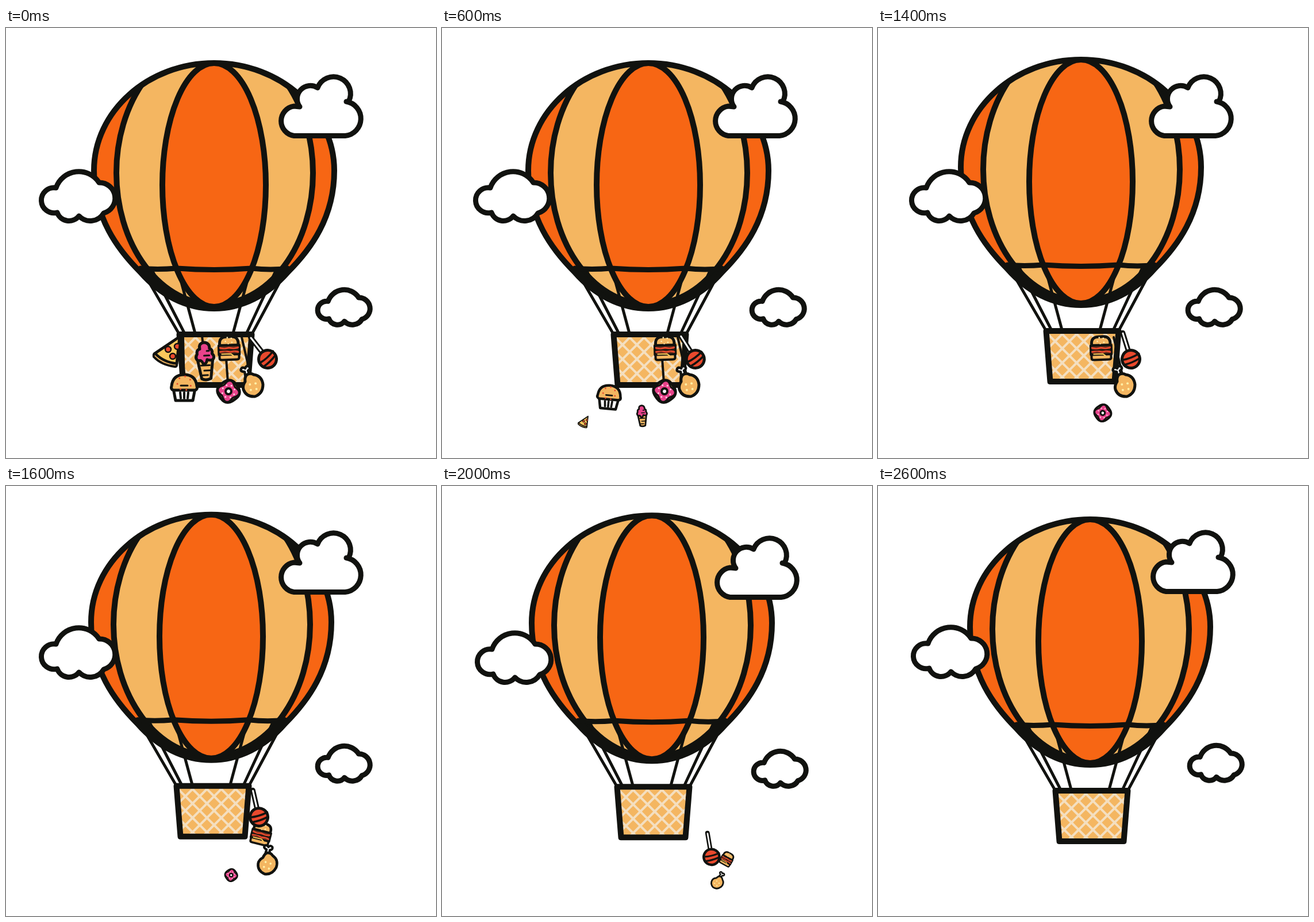
Recreate the animation shown at these times as an HTML page with a canvas. Size 748 px wide and 748 px high, loop 2800 ms.

```html
<!DOCTYPE html>
<html lang="en">
<head>
<meta charset="utf-8">
<title>Food balloon</title>
<style>
html, body { margin: 0; width: 100%; height: 100%; overflow: hidden; background: #fff; }
canvas { display: block; width: 748px; height: 748px; }
</style>
</head>
<body>
<canvas id="stage" width="748" height="748"></canvas>
<script>
const ctx = document.getElementById('stage').getContext('2d');
const INK = '#11120f', ORANGE = '#f76614', SAND = '#f4b661', RED = '#e9492d', PINK = '#e8438b', CREAM = '#f4dfc0';
const STEP = 200, STEPS = 14, TAU = Math.PI * 2;

function shape(d, fill, width = 5, stroke = INK) {
  const path = typeof d === 'string' ? new Path2D(d) : d;
  if (fill) { ctx.fillStyle = fill; ctx.fill(path); }
  if (width) { ctx.lineWidth = width; ctx.strokeStyle = stroke; ctx.stroke(path); }
}

function ellipse(x, y, rx, ry = rx) {
  const path = new Path2D();
  path.ellipse(x, y, rx, ry, 0, 0, TAU);
  return path;
}

// Closed curve r = radius + depth * cos(4a): a round shape with four lobes.
function lobes(radius, depth) {
  const path = new Path2D();
  for (let a = 0; a < TAU; a += TAU / 60) {
    const r = radius + depth * Math.cos(4 * a);
    path.lineTo(r * Math.cos(a), r * Math.sin(a));
  }
  path.closePath();
  return path;
}

function ringOfDots(count, radius, x, y, color, size) {
  for (let i = 0; i < count; i++) {
    const a = (i + 0.4) * TAU / count;
    shape(ellipse(x + radius * Math.cos(a), y + radius * Math.sin(a), size), color, 0);
  }
}

function placed(x, y, scale, degrees, draw) {
  ctx.save();
  ctx.translate(x, y);
  ctx.rotate(degrees * Math.PI / 180);
  ctx.scale(scale, scale);
  draw();
  ctx.restore();
}

function clipped(path, draw) {
  ctx.save();
  ctx.clip(path);
  draw();
  ctx.restore();
}

const envelope = new Path2D('M153 248C153 145 247 61 362 61S571 145 571 248C571 330 530 385 490 425' +
  'C455 465 410 488 362 488S269 465 234 425C194 385 153 330 153 248Z');
const basket = new Path2D('M301.5 533H427.5L420.5 621H308.5Z');
const ropes = new Path2D('M236 420L301 532M256 425L311 532M299 420L329 531' +
  'M488 420L428 532M468 425L418 532M425 420L395 531');

function drawBalloon() {
  shape(ropes);
  clipped(envelope, () => {
    shape(envelope, ORANGE, 0);
    shape(ellipse(363, 252, 171, 229), SAND, 10);
    shape(ropes);
    shape('M234 425C269 465 314 488 362 488S455 465 490 425', null, 20);
    shape(ellipse(362, 273, 90, 212), ORANGE, 10);
  });
  shape(envelope, null, 10);
  shape('M234 418Q262 421 297 418Q362 423 427 418Q462 422 490 418', null, 9);

  shape(basket, SAND, 0);
  clipped(basket, () => {
    for (let x = 187; x < 540; x += 25) shape(`M${x} 521l110 110M${x} 631l110 -110`, null, 4, CREAM);
  });
  shape(basket, null, 10);
}

const bigCloud = new Path2D('M501 187.5A26 26 0 0 1 501 136L511 137A23 23 0 0 1 542 104' +
  'A29.6 29.6 0 1 1 596 128L592 128A30 30 0 0 1 590 187.5Z');
const puffCloud = new Path2D('M87 278A42 42 0 0 1 162 269A27 27 0 0 1 170 322A27 27 0 0 1 127 327' +
  'A22 22 0 0 1 89 321A22 22 0 1 1 87 278Z');

function drawClouds() {
  shape(bigCloud, '#fff', 9);
  shape(puffCloud, '#fff', 9);
  placed(498.5, 278, 0.71, 0, () => shape(puffCloud, '#fff', 9 / 0.71));
}

function pizza() {
  const slice = new Path2D('M22 -25L-21 4Q-6 20 17 22Z');
  shape(slice, '#fbc75c');
  clipped(slice, () => {
    for (let i = 0; i < 3; i++) shape(ellipse(2 + 12 * (i % 2) + 4 * i, -3 - 11 * (i % 2) + 6 * i, 5), RED, 2.5);
  });
  shape('M-21 4Q-6 20 17 22Q18 28 13 27Q-10 24 -23 10Q-24 5 -21 4Z', SAND, 4);
}

function iceCream() {
  shape('M-13 -4L-7 31Q0 35 9 31L14 -4Z', SAND);
  shape('M-7 8H8M-2 17H9M-5 25H4', null, 3);
  shape('M-11 0Q-18 -5 -13 -12Q-14 -20 -8 -21Q-10 -31 0 -32Q10 -31 9 -21Q15 -19 13 -12' +
    'Q19 -6 13 -1Q8 0 4 -2Q2 7 -3 5Q-6 -3 -11 0Z', PINK);
  shape('M-1 -9H8M4 -17H8', null, 3);
}

function burger() {
  shape('M-16 -5Q-18 -20 -4 -20H4Q18 -20 16 -5Z', SAND);
  ringOfDots(5, 6, 0, -13, '#fff0b8', 1.3);
  shape('M-17 10H17V17Q17 20 13 20H-13Q-17 20 -17 17Z', SAND, 4);
  shape('M-18 -5H18V11H-18Z', '#76331f', 4);
  shape('M-16 -1L-8 1L0 -1L8 1L16 -1M-16 6L-7 4L2 7L9 5L16 7', null, 2.5, RED);
  shape('M-16 3H16', null, 2);
  shape('M-13 10H3L7 13', null, 2, '#ffd05a');
}

function cupcake() {
  shape('M-19 1L-15 22H15L19 1Z', '#fff');
  shape('M-7 8L-6 18M0 8V18M7 8L6 18', null, 4);
  shape('M-19 4Q-24 2 -22 -3Q-20 -23 0 -23T22 -3Q24 2 19 4Z', SAND);
  shape('M-6 -4H6', null, 3);
  ringOfDots(7, 12, 0, -8, RED, 1.5);
}

function donut() {
  shape(lobes(18.5, 0.8), '#f8d26c');
  shape(lobes(16, 2.5), PINK, 3);
  ringOfDots(8, 11, 0, 0, '#ffd3e5', 1.5);
  shape(ellipse(0, 0, 5), '#fff', 4);
}

function chicken() {
  shape('M-12 -12L-14 -22Q-22 -22 -20 -27Q-18 -31 -13 -28Q-11 -34 -6 -31Q-3 -27 -8 -24L-4 -14Z', '#fff', 4.5);
  shape('M-11 -16Q-5 -21 2 -17Q16 -15 18 0Q18 16 4 21Q-11 22 -16 9Q-18 2 -13 -5Q-14 -11 -11 -16Z', SAND);
  ringOfDots(4, 7, 1, 4, '#fff0a8', 2);
}

function lollipop() {
  shape('M0 -14V-48', null, 9);
  shape('M0 -14V-47', null, 3, '#fff');
  shape(ellipse(0, 0, 15.5), RED);
  shape('M-15 -3Q0 -1 16 -5M-14 6Q0 7 15 3', null, 3.5);
}

// Each food hangs at (x, y), lets go after step `hold` and drifts by (dx, dy) while it shrinks.
const foods = [
  { draw: iceCream, x: 346, y: 579, angle: -3, hold: 0, life: 5, dx: 2, dy: 102, turn: 0, hook: [341, 536] },
  { draw: donut, x: 387, y: 632, angle: 10, hold: 5, life: 5, dx: 5, dy: 48, turn: 0, hook: [383, 575] },
  { draw: burger, x: 388, y: 557, angle: -2, hold: 7, life: 5, dx: 115, dy: 98, turn: 33 },
  { draw: pizza, x: 280, y: 562, angle: 0, hold: 0, life: 4, dx: -35, dy: 125, turn: 0 },
  { draw: cupcake, x: 310, y: 626, angle: 0, hold: 2, life: 4.5, dx: -37, dy: 31, turn: 10, hook: [308, 538] },
  { draw: lollipop, x: 440, y: 576, angle: -8, hold: 9, life: 4, dx: 50, dy: 120, turn: -3, swing: true },
  { draw: chicken, x: 429, y: 620, angle: 0, hold: 7, life: 5, dx: 54, dy: 74, turn: 56, hook: [410, 538] }
];

function drawFood(food, step) {
  const t = Math.max(0, step - food.hold) / food.life;
  if (t >= 1) return;
  const drift = 1 - (1 - t) ** 3;
  let x = food.x + food.dx * drift;
  let angle = food.angle + food.turn * drift;
  if (food.swing) {
    x += 15 * Math.exp(-step);
    angle -= 30 * (1 - Math.min(1, step / food.hold) ** 1.5);
  }
  placed(x, food.y + food.dy * drift, 1 - 0.95 * t ** 1.5, angle, food.draw);
}

function cloudOffset(step) {
  const s = Math.min(step, 12), a = s * TAU / 4;
  const r = s < 9 ? Math.min(3, 3 * s) : 16 - s;
  return [r * Math.sin(a), -r * Math.cos(a)];
}

// A small orbit at first, then a wider arc up and over to the right.
function balloonOffset(step) {
  if (step < 7) {
    const a = (step - 0.5) * TAU / 4, r = 1.5 * Math.SQRT2;
    return [r * Math.cos(a) - 1.5, r * Math.sin(a) + 1.5];
  }
  const t = Math.min(1, (step - 7) / 4);
  return [-9 + 16 * t, -6 + 3 * t - 8.5 * Math.sin(Math.PI * t)];
}

function render(step) {
  ctx.fillStyle = '#fff';
  ctx.fillRect(0, 0, 748, 748);
  ctx.lineJoin = ctx.lineCap = 'round';
  placed(...balloonOffset(step), 1, 0, drawBalloon);
  placed(...cloudOffset(step), 1, 0, drawClouds);
  for (const { hook, hold, x, y } of foods) {
    if (hook && step <= hold) shape(`M${hook}L${x} ${y}`, null, 4);
  }
  for (const food of foods) drawFood(food, step);
}

const start = performance.now();
function tick() {
  render(Math.floor((performance.now() - start) / STEP) % STEPS);
  requestAnimationFrame(tick);
}
tick();
</script>
</body>
</html>
```
